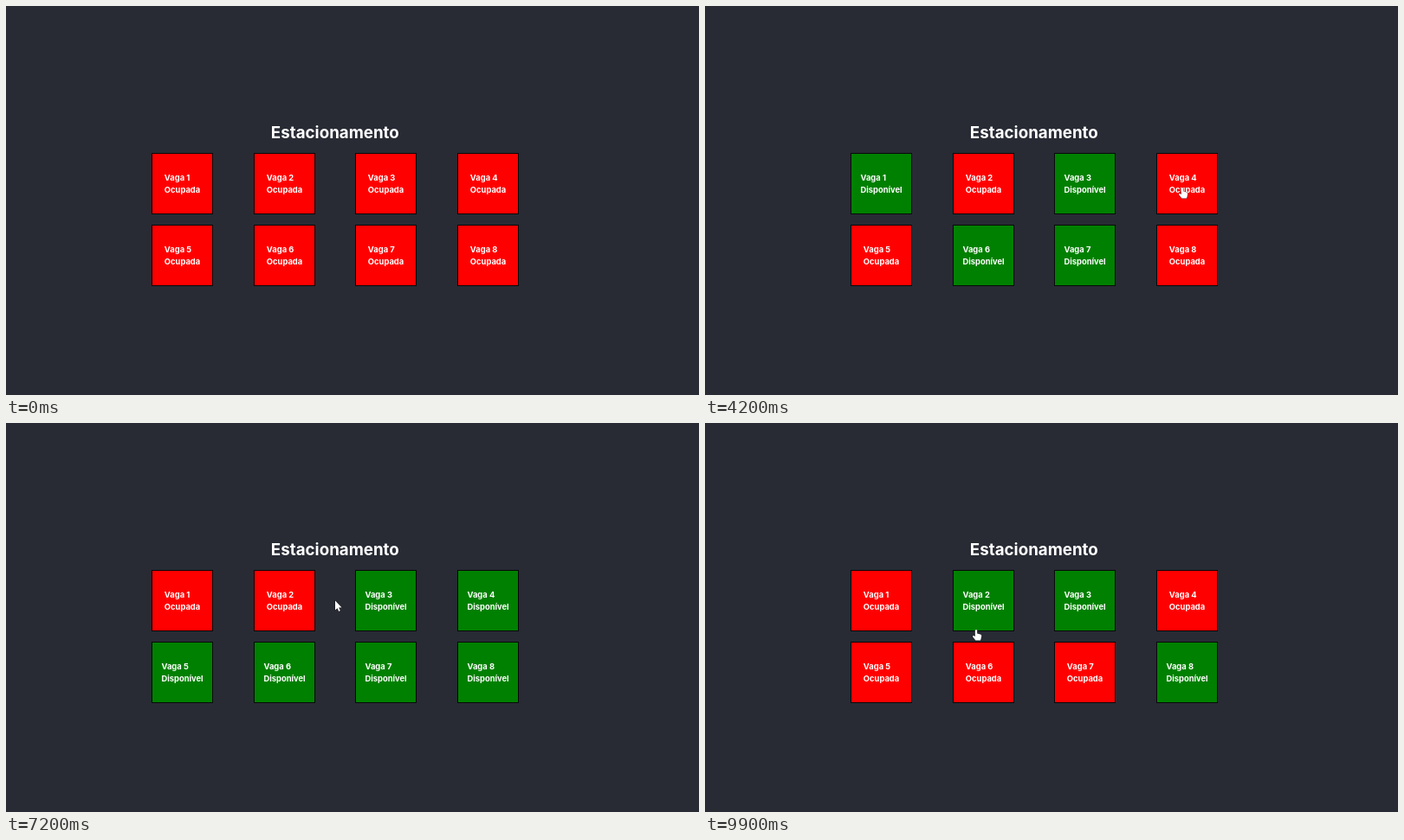
Recreate the animation shown at these times as an HTML page with a canvas. Size 800x450 px, loop 10 s.

```html
<!DOCTYPE html>
<html lang="pt">
<head>
<meta charset="utf-8">
<title>Estacionamento</title>
<style>
html, body { margin: 0; width: 100%; height: 100%; overflow: hidden; background: #282b34; }
canvas { display: block; width: 800px; height: 450px; }
</style>
</head>
<body>
<canvas id="stage"></canvas>
<script>
const LOOP = 10000, STEP = 100;
const EM = 9.37, SIZE = 71;
const BACK = '#282b34';
const canvas = document.getElementById('stage');
const ctx = canvas.getContext('2d');
const dpr = window.devicePixelRatio || 1;
canvas.width = 800 * dpr;
canvas.height = 450 * dpr;

const spots = Array.from({ length: 8 }, (_, i) => ({
  x: Math.round(168.4 + (i % 4) * 117.4),
  y: Math.round(170.3 + Math.floor(i / 4) * 82.4)
}));

// Spots are clicked in turn: a slow round that frees them, then a quick one
const round = (order, start, gap) => order.map((n, k) => ({
  t: start + k * gap,
  x: spots[n - 1].x + SIZE / 2,
  y: spots[n - 1].y + SIZE / 2,
  n
}));
const clicks = [
  ...round([1, 7, 3, 6, 4, 8, 2, 5], 1430, 695),
  ...round([1, 2, 3, 7, 6, 5, 4, 3, 2], 6600, 400)
];

// Places the pointer passes between clicks
const stops = [
  { t: 1000, x: 250, y: 222 },
  { t: 2600, x: 450, y: 189 },
  { t: 4200, x: 551, y: 210 },
  { t: 5100, x: 550, y: 286 },
  { t: 6400, x: 215, y: 259 },
  { t: 8100, x: 320, y: 309 },
  { t: 9900, x: 313, y: 239 }
];
const path = [...clicks, ...stops].sort((a, b) => a.t - b.t);

const hand = new Path2D('M-1.2 1Q0-.8 1.2 1L1.2 4.6L5 5.6Q6.4 6 6.3 7.6L5.7 10.2L5 12.6L-.6 12.6L-3.8 8.4Q-4.2 6.4-2.6 6.9L-1.2 8.1Z');
const arrow = new Path2D('M0 0L0 11L2.5 8.7L4.2 12.4L5.9 11.6L4.2 8L7.6 8Z');

function setFont(size) {
  ctx.font = `700 ${size}px Inter, sans-serif`;
}

function drawSpot({ x, y }, i, free) {
  const label = free ? 'Disponível' : 'Ocupada';
  ctx.fillStyle = free ? '#008000' : '#ff0000';
  ctx.fillRect(x + 1, y + 1, SIZE - 2, SIZE - 2);
  ctx.strokeStyle = 'rgba(0,0,0,.8)';
  ctx.lineWidth = 1;
  ctx.strokeRect(x + 0.5, y + 0.5, SIZE - 1, SIZE - 1);
  ctx.fillStyle = '#fff';
  setFont(EM);
  const left = x + (SIZE - ctx.measureText(label).width) / 2;
  ctx.fillText(`Vaga ${i + 1}`, left, y + 32.3);
  ctx.fillText(label, left, y + 32.3 + EM * 1.5);
}

function pointerAt(t) {
  const next = path.findIndex(p => p.t > t);
  if (next === 0) return null;
  if (next < 0) return path[path.length - 1];
  const a = path[next - 1], b = path[next];
  const k = (t - a.t) / (b.t - a.t);
  const e = k * k * (3 - 2 * k);
  return { x: a.x + (b.x - a.x) * e, y: a.y + (b.y - a.y) * e };
}

function drawPointer({ x, y }) {
  const over = spots.some(s => x >= s.x && x <= s.x + SIZE && y >= s.y && y <= s.y + SIZE);
  const shape = over ? hand : arrow;
  ctx.save();
  ctx.translate(x, y);
  ctx.lineWidth = 0.8;
  ctx.strokeStyle = 'rgba(0,0,0,.75)';
  ctx.stroke(shape);
  ctx.fillStyle = '#fff';
  ctx.fill(shape);
  ctx.restore();
}

function draw(t) {
  ctx.setTransform(dpr, 0, 0, dpr, 0, 0);
  ctx.fillStyle = BACK;
  ctx.fillRect(0, 0, 800, 450);
  ctx.fillStyle = '#fff';
  setFont(EM * 2);
  ctx.textAlign = 'center';
  ctx.fillText('Estacionamento', 379.8, 152.7);
  ctx.textAlign = 'left';
  spots.forEach((spot, i) => {
    const count = clicks.filter(c => c.n === i + 1 && c.t <= t).length;
    drawSpot(spot, i, count % 2 === 1);
  });
  const pointer = pointerAt(t);
  if (pointer) drawPointer(pointer);
}

function tick() {
  draw(Math.floor(performance.now() % LOOP / STEP) * STEP);
  requestAnimationFrame(tick);
}
tick();
</script>
</body>
</html>
```
